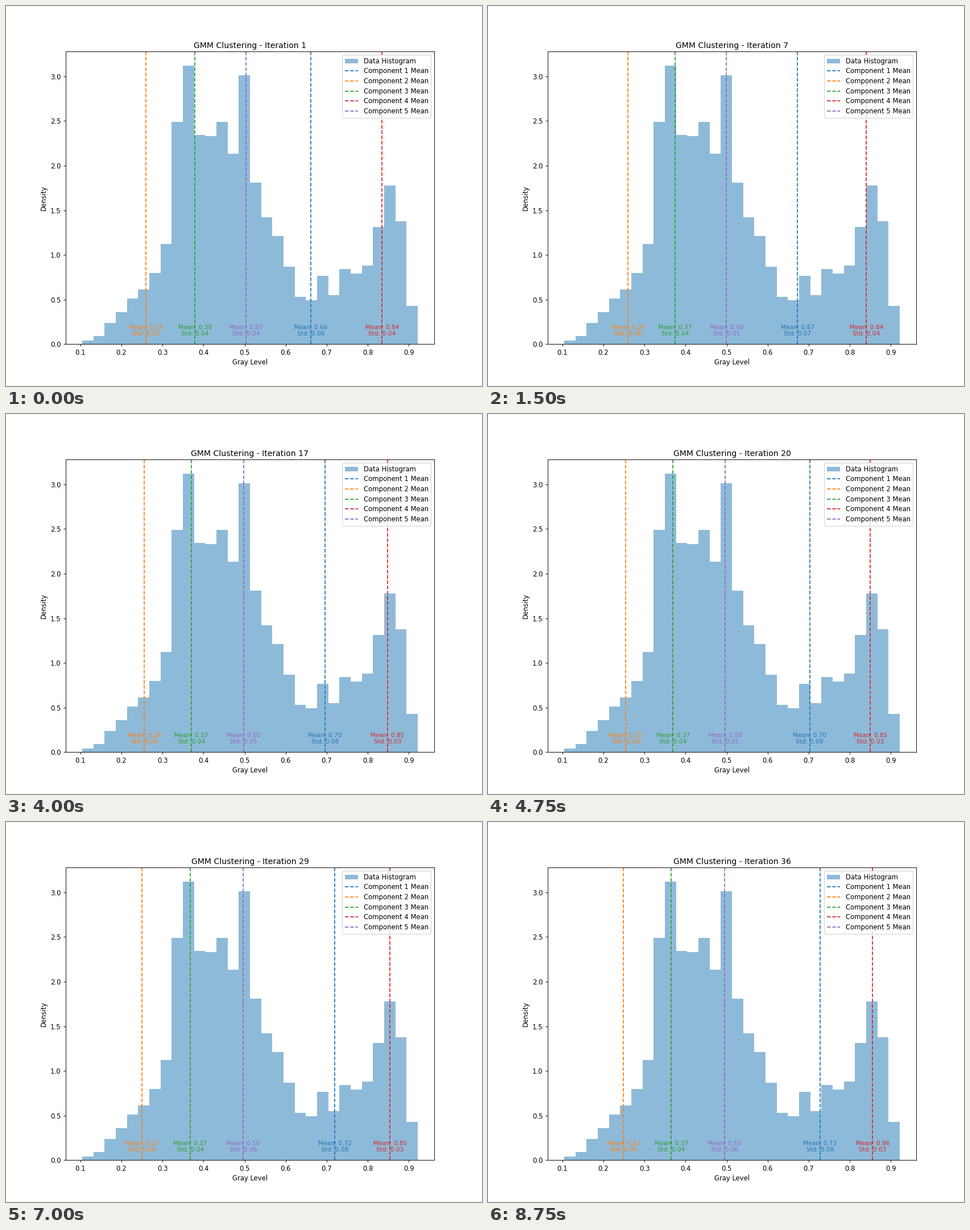
Recreate the animation shown at these times as a matplotlib script. Size 837 by 669 pixels, loop 9 s.

```python
import numpy as np
import matplotlib.pyplot as plt
from matplotlib.animation import FuncAnimation

plt.rcParams["font.family"] = "DejaVu Sans"

WIDTH, HEIGHT, DPI = 837, 669, 83.7
FRAMES, INTERVAL = 36, 250

# Histogram densities over equal bins
LO, HI = 0.10458, 0.92157
DENSITY = [
    0.04, 0.09, 0.24, 0.36, 0.51, 0.61, 0.80, 1.12, 2.49, 3.12,
    2.34, 2.33, 2.49, 2.13, 3.01, 1.81, 1.42, 1.21, 0.87, 0.53,
    0.49, 0.765, 0.55, 0.845, 0.79, 0.88, 1.31, 1.775, 1.375, 0.43,
]

# Evenly spaced key values of each component: mean, standard deviation
COMPONENTS = [
    ([0.6610, 0.6855, 0.7115, 0.7276], [0.064, 0.081, 0.0815]),
    ([0.2599, 0.2579, 0.2515, 0.2489], [0.0548, 0.058, 0.0545]),
    ([0.3790, 0.3715, 0.3687, 0.3653], [0.04]),
    ([0.8352, 0.8453, 0.8525, 0.8557], [0.0415, 0.034, 0.0315]),
    ([0.5030, 0.4979, 0.4969, 0.4952], [0.043, 0.054, 0.057]),
]


def curve(keys):
    """Polynomial through the keys, spread evenly over the loop, per frame."""
    poly = np.polyfit(np.linspace(0, 1, len(keys)), keys, len(keys) - 1)
    return np.polyval(poly, np.linspace(0, 1, FRAMES))


fig, ax = plt.subplots(
    figsize=((WIDTH + 0.01) / DPI, (HEIGHT + 0.01) / DPI), dpi=DPI)

edges = np.linspace(LO, HI, len(DENSITY) + 1)
ax.hist((edges[:-1] + edges[1:]) / 2, bins=edges, weights=DENSITY,
        color="C0", alpha=0.5, label="Data Histogram")

markers = []
for i, (means, stds) in enumerate(COMPONENTS):
    line = ax.axvline(means[0], color=f"C{i}", linestyle="--",
                      label=f"Component {i + 1} Mean")
    note = ax.text(means[0], 0.1, "", color=f"C{i}", fontsize=9,
                   ha="center", linespacing=1.13)
    markers.append((line, note, curve(means), curve(stds)))

title = ax.set_title("", pad=5.3)
ax.set_xlabel("Gray Level", labelpad=3.4)
ax.set_ylabel("Density")
ax.legend(loc="upper right", labelspacing=0.4)


def update(frame):
    title.set_text(f"GMM Clustering - Iteration {frame + 1}")
    for line, note, means, stds in markers:
        mean = means[frame]
        line.set_xdata([mean, mean])
        note.set_x(mean)
        note.set_text(f"Mean: {mean:.2f}\nStd: {stds[frame]:.2f}")
    return [title]


anim = FuncAnimation(fig, update, frames=FRAMES, init_func=lambda: update(0),
                     interval=INTERVAL, repeat=True, repeat_delay=0)
plt.show()
```
